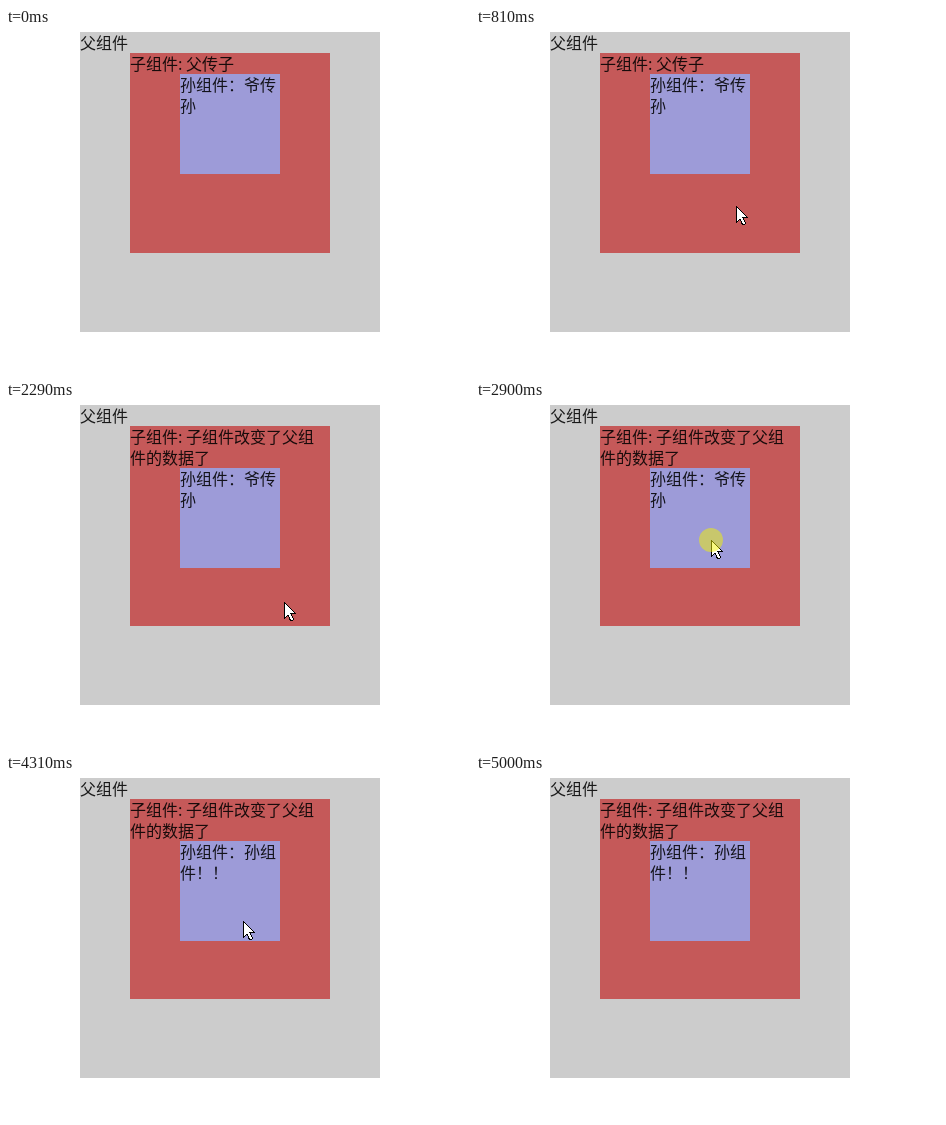
Recreate the animation shown at these times as an HTML page. Size 464 by 345 pixels, loop 5380 ms.

```html
<!DOCTYPE html>
<html lang="zh-CN">
<head>
<meta charset="utf-8">
<style>
  html, body { margin: 0; width: 100%; height: 100%; overflow: hidden; background: #fff; }
  svg { display: block; width: 464px; height: 345px; }
  text { font: 300 16px "Noto Sans CJK SC", "Noto Sans CJK", "Noto Sans CJK JP", sans-serif; fill-opacity: .88; white-space: pre; }
</style>
</head>
<body>
<svg viewBox="0 0 464 345">
  <rect x="74" y="4" width="300" height="300" fill="#ccc"/>
  <rect x="124" y="25" width="200" height="200" fill="#c55959"/>
  <text x="74" y="21">父组件</text>
  <text id="child1" x="124" y="42"></text>
  <text id="child2" x="124" y="63"></text>
  <g id="grand">
    <rect x="174" y="46" width="100" height="100" fill="#9d9bd8"/>
    <text id="grand1" x="174" y="63"></text>
    <text id="grand2" x="174" y="84"></text>
  </g>
  <g id="pointer">
    <path d="M.5 .5V16.5L4 13L6.5 18.5H8.5L9.5 17.5L7 11.5H11.5Z" fill="#fff" stroke="#000" shape-rendering="crispEdges"/>
    <circle id="click" r="12" fill="#f4f400" fill-opacity=".5"/>
  </g>
</svg>
<script>
const LOOP = 5380, STEP = 76;
const ENTER = 200, LEAVE = 5000;
const CHILD_CLICK = 1190, CHILD_CHANGE = 1280;
const GRAND_CLICK = 2900, GRAND_CHANGE = 3070;

// Each move follows a curve in whole steps, then rests until the next one.
const MOVES = [
  { at: ENTER, steps: 7, from: [428, 291], bend: [250, 107], to: [243, 150] },
  { at: 810, steps: 2, from: [260, 178], to: [276, 201] },
  { at: 2290, steps: 3, from: [278, 201], to: [231, 128] },
  { at: 2750, steps: 2, from: [233, 134], to: [236, 143] },
  { at: 4310, steps: 6, from: [237, 147], bend: [530, 270], to: [426, 314] },
  { at: 4770, steps: 2, from: [426, 314], to: [454, 337] }
];

const el = id => document.getElementById(id);
const write = (id, s) => { if (el(id).textContent !== s) el(id).textContent = s; };
const show = (id, on) => { el(id).style.display = on ? '' : 'none'; };
const place = (id, x, y) => el(id).setAttribute('transform', `translate(${x} ${y})`);
const within = (t, from, to) => t >= from && t < to;

function pointerAt(t) {
  const { at, steps, from, bend, to } = MOVES.findLast(move => move.at <= t);
  const p = Math.min(1, Math.floor((t - at) / STEP) / steps), q = 1 - p;
  return from.map((a, i) => {
    const b = bend ? bend[i] : (a + to[i]) / 2;
    return Math.round(q * q * a + 2 * p * q * b + p * p * to[i]);
  });
}

function draw(t) {
  const childChanged = t >= CHILD_CHANGE, grandChanged = t >= GRAND_CHANGE;
  write('child1', '子组件: ' + (childChanged ? '子组件改变了父组' : '父传子'));
  write('child2', childChanged ? '件的数据了' : '');
  write('grand1', '孙组件：' + (grandChanged ? '孙组' : '爷传'));
  write('grand2', grandChanged ? '件！！' : '孙');
  place('grand', 0, childChanged ? 21 : 0);

  const visible = within(t, ENTER, LEAVE);
  show('pointer', visible);
  show('click', within(t, CHILD_CLICK, CHILD_CHANGE) || within(t, GRAND_CLICK, GRAND_CHANGE));
  if (visible) place('pointer', ...pointerAt(t));
}

const start = performance.now();
function tick() {
  draw((performance.now() - start) % LOOP);
  requestAnimationFrame(tick);
}
tick();
</script>
</body>
</html>
```
